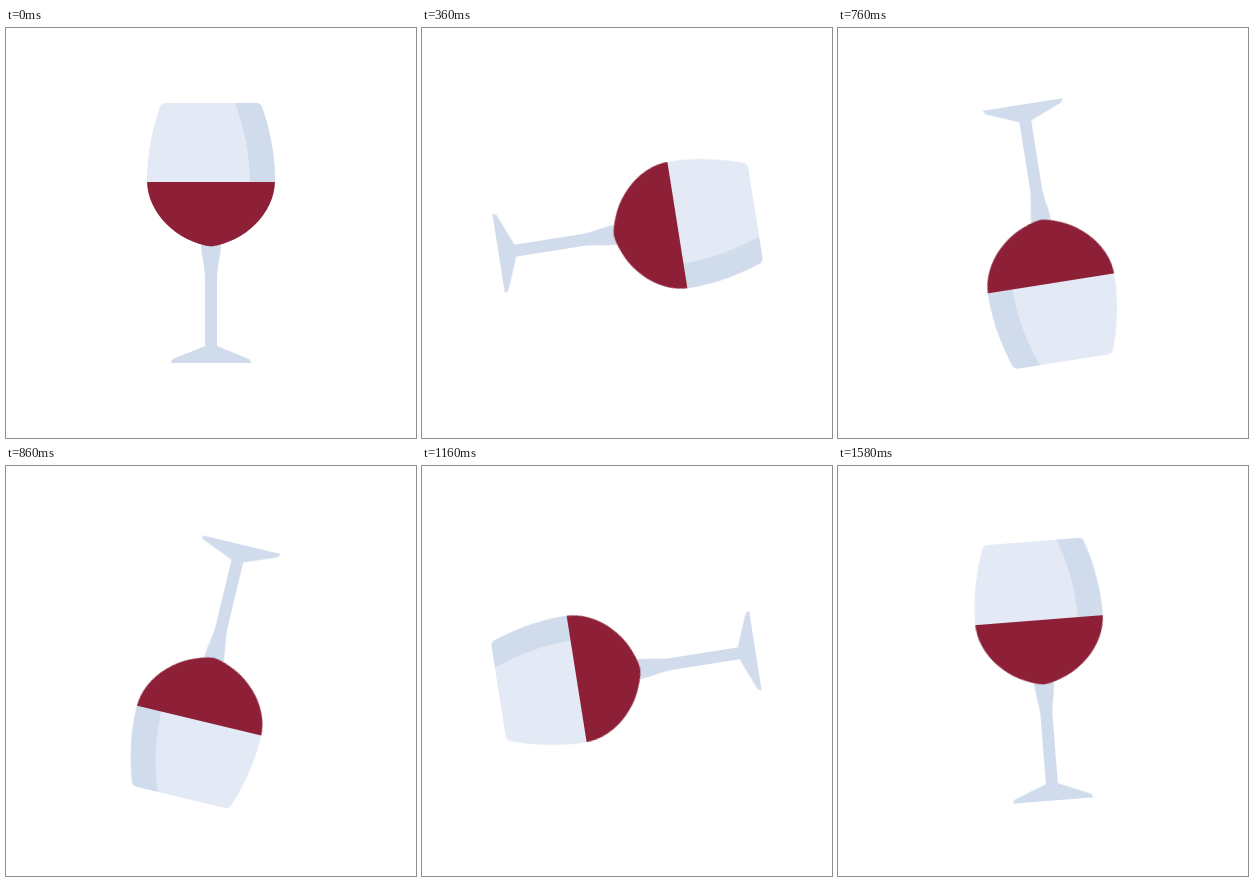
An HTML page without scripts that plays this animation: 410x410 px, repeating every 1.6 s.

```html
<!DOCTYPE html>
<html lang="en">
<head>
<meta charset="utf-8">
<title>Spinning wine glass</title>
<style>
  html, body { margin: 0; width: 100%; height: 100%; overflow: hidden; background: #fff; }
  svg { display: block; width: 100vw; height: 100vh; }
  /* 80 held poses of 20 ms; the small lead keeps each pose clear of its boundary */
  .glass { transform-origin: 205px 205px; animation: spin 1600ms steps(80) -1ms infinite; }
  @keyframes spin { to { transform: rotate(360deg); } }
  .bowl { fill: #e3e9f5; }
  .shade { fill: #d0dcec; }
  .wine { fill: #8d2036; }
</style>
</head>
<body>
<svg viewBox="0 0 410 410">
  <defs>
    <path id="bowl" d="M160 75H250Q254.500 75 256 79C262 96 269 122 269 152C269 186 238 214 205 218.500C172 214 141 186 141 152C141 122 148 96 154 79Q155.500 75 160 75Z"/>
    <clipPath id="inside"><use href="#bowl"/></clipPath>
  </defs>
  <g class="glass">
    <path class="shade" d="M195 214C195 229 199 236 199 252V318L167 331Q165 332 165 335H245Q245 332 243 331L211 318V252C211 236 215 229 215 214Z"/>
    <use class="bowl" href="#bowl"/>
    <g clip-path="url(#inside)">
      <path class="shade" d="M229 75C238 100 244 125 244 156H270V75Z"/>
      <rect class="wine" x="140" y="154" width="130" height="66"/>
    </g>
  </g>
</svg>
</body>
</html>
```
